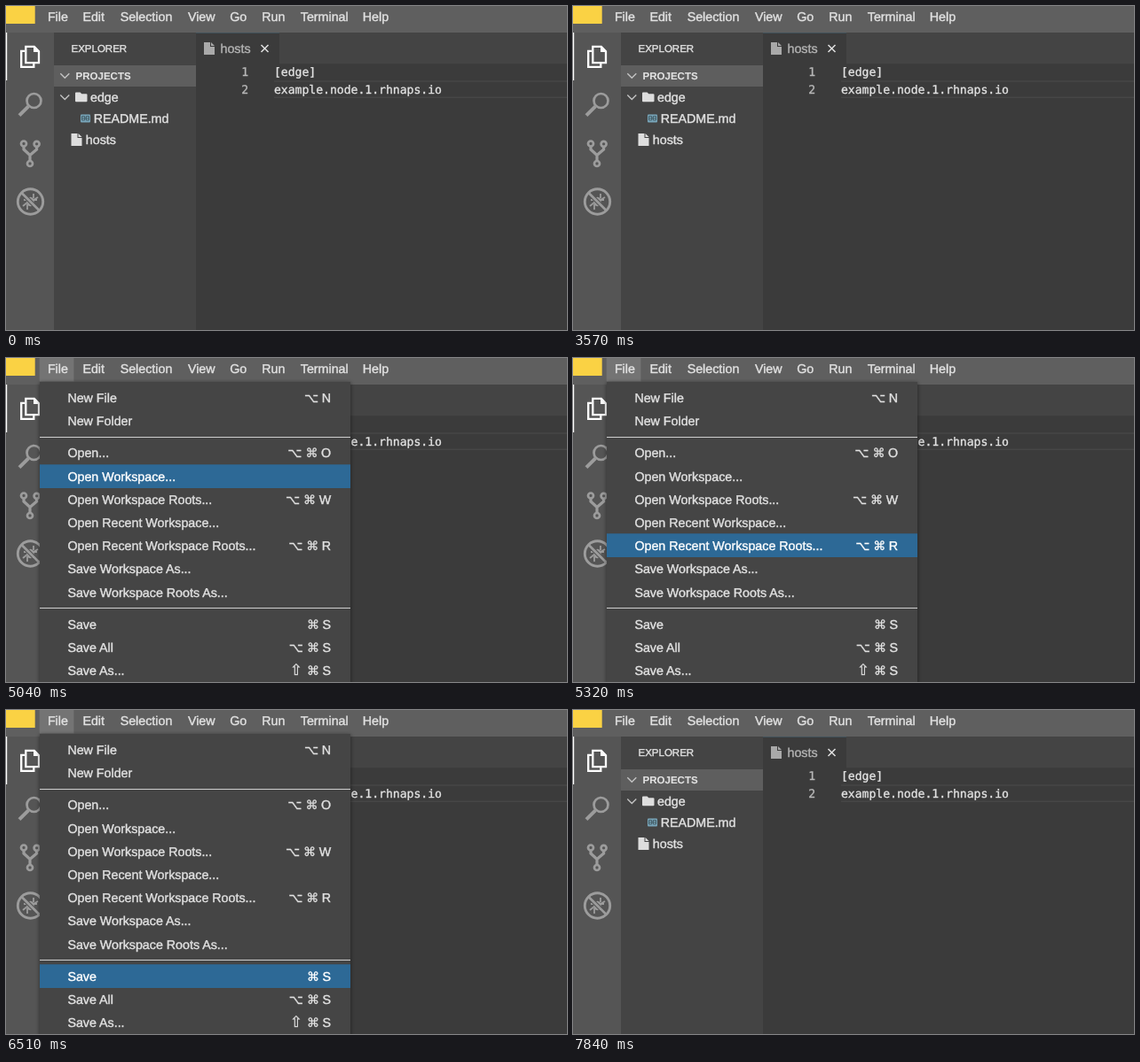
An HTML page that plays this animation: 632x366 px, repeating every 9.52 s.

```html
<!DOCTYPE html>
<html lang="en">
<head>
<meta charset="utf-8">
<title>Editor menu</title>
<style>
  html, body { margin: 0; width: 100%; height: 100%; overflow: hidden; background: #3b3b3b; }
  svg { display: block; width: 632px; height: 366px; }
  text {
    font: 14.25px "Liberation Sans", Arial, sans-serif;
    fill: currentColor; stroke: currentColor; stroke-width: .4px;
    color: #e2e2e2; text-rendering: geometricPrecision; white-space: pre;
  }
  .small { font-size: 11.5px; }
  .bold { font-weight: bold; stroke-width: .1px; }
  .code { font: 13.08px "DejaVu Sans Mono", monospace; stroke-width: .35px; }
  .key { font: 14px "DejaVu Sans", sans-serif; text-anchor: middle; stroke-width: .3px; }
  .shift { font-size: 17px; }
  .end { text-anchor: end; }
  .line { fill: none; stroke: #9c9c9c; stroke-width: 2.7; }
  #menu { visibility: hidden; }
  #menu.open { visibility: visible; }
  .row rect { fill: none; }
  .row.on rect { fill: #2d6996; }
  .row.on text { color: #fff; }
</style>
</head>
<body>
<svg viewBox="0 0 632 366">
  <defs>
    <path id="page" d="M0 0H7V5H12V14H0ZM8 0L12 4H8Z"/>
    <path id="chevron" d="M0 0L5 5L10 0" fill="none" stroke="#c4c4c4" stroke-width="1.3"/>
    <filter id="shadow" x="-5%" y="-5%" width="110%" height="110%">
      <feDropShadow dx="0" dy="1" stdDeviation="2.6" flood-color="#000" flood-opacity=".5"/>
    </filter>
  </defs>

  <!-- panels -->
  <rect width="632" height="366" fill="#3b3b3b"/>
  <rect width="632" height="30" fill="#5f5f5f"/>
  <rect y="30" width="54" height="336" fill="#555"/>
  <rect x="54" y="30" width="160" height="336" fill="#444"/>
  <rect x="54" y="67" width="160" height="24" fill="#5e5e5e"/>
  <rect x="308" y="30" width="324" height="35.3" fill="#444"/>
  <rect x="214" y="30" width="94" height="1" fill="#40505a"/>
  <rect width="32.7" height="20" fill="#fad244"/>

  <!-- activity bar -->
  <rect y="30" width="1.2" height="54" fill="#fff"/>
  <g class="line" style="stroke:#fff;stroke-width:2.3">
    <path d="M21 50.8H17.2V68.9H31.3V65"/>
    <path d="M22.3 45.8H31.8L37 51.3V64.2H22.3Z"/>
    <path d="M31 46V52H37Z" fill="#fff" stroke="none"/>
  </g>
  <g class="line">
    <circle cx="31.5" cy="107" r="8"/>
    <path d="M25.3 113.3L15 123.7" stroke-width="4"/>
    <circle cx="20" cy="155.5" r="3"/>
    <circle cx="34.6" cy="155.8" r="3"/>
    <circle cx="27" cy="178" r="3"/>
    <path d="M20 158.5V162L27 168.5V175M34.6 159V162L27 168.5" stroke-width="3.2"/>
    <circle cx="27.5" cy="221" r="14.2" stroke-width="2.9"/>
    <path d="M20 219H35M19 226L24 222M36 216L31 219M24 230V224M31 212V217M22 214L25 217M33 227L30 224" stroke-width="1.8"/>
    <ellipse cx="27.5" cy="221" rx="4.2" ry="5.2" fill="#9c9c9c" stroke="none"/>
    <path d="M19 212.5L36 229.5" stroke="#555" stroke-width="5"/>
    <path d="M17.5 211L37.5 231" stroke-width="2.6"/>
  </g>

  <!-- explorer -->
  <text class="small" x="73.5" y="52">EXPLORER</text>
  <use href="#chevron" x="61.3" y="76.3"/>
  <text class="small bold" x="78.6" y="83">PROJECTS</text>
  <use href="#chevron" x="61.3" y="100.5"/>
  <path d="M78 98.5Q78 97.5 79 97.5H83.5L85.3 99.3H90.5Q91.5 99.3 91.5 100.3V107.3Q91.5 108.3 90.5 108.3H79Q78 108.3 78 107.3Z" fill="#dedede"/>
  <text x="95" y="108">edge</text>
  <rect x="84" y="122.5" width="11" height="9" rx="1" fill="#78a6ba"/>
  <path d="M85.5 124.5H88.7V129H85.5ZM90.3 124.5H93.5V129H90.3ZM85.5 126.8H93.5" fill="none" stroke="#40565f" stroke-width=".9"/>
  <text x="98.7" y="132">README.md</text>
  <use href="#page" x="73.5" y="144" fill="#dedede"/>
  <text x="89.8" y="156">hosts</text>

  <!-- editor -->
  <use href="#page" x="223" y="41" fill="#a9a9a9"/>
  <text x="241.5" y="53" style="color:#b4b4b4">hosts</text>
  <path d="M287.5 44L295.5 52M295.5 44L287.5 52" class="line" style="stroke:#e2e2e2;stroke-width:1.5"/>
  <path d="M302 85H632M302 103.3H632" stroke="#464646" stroke-width="1.6"/>
  <text class="code end" x="273" y="79" style="color:#b8b8b8">1</text>
  <text class="code end" x="273" y="99" style="color:#b8b8b8">2</text>
  <text class="code" x="302" y="79">[edge]</text>
  <text class="code" x="302" y="99">example.node.1.rhnaps.io</text>

  <g id="menu">
    <rect x="37.7" width="38.7" height="26.5" fill="#747474"/>
    <rect x="38" y="27" width="350" height="350" fill="#444" filter="url(#shadow)"/>
    <path d="M38 89.5H388M38 282.5H388" stroke="#cfcfcf"/>
    <g id="rows"></g>
  </g>

  <g id="bar">
    <text x="46.9" y="16.7">File</text>
    <text x="86.4" y="16.7">Edit</text>
    <text x="128.7" y="16.7">Selection</text>
    <text x="204.9" y="16.7">View</text>
    <text x="252.2" y="16.7">Go</text>
    <text x="288.3" y="16.7">Run</text>
    <text x="331.8" y="16.7">Terminal</text>
    <text x="401.8" y="16.7">Help</text>
  </g>
</svg>
<script>
  const LOOP = 9520, OPEN = 3710, CLOSE = 6580;
  // top, label, shortcut
  const items = [
    [32, 'New File', '⌥N'],
    [58, 'New Folder', ''],
    [94, 'Open...', '⌥⌘O'],
    [121, 'Open Workspace...', ''],
    [147, 'Open Workspace Roots...', '⌥⌘W'],
    [173, 'Open Recent Workspace...', ''],
    [199, 'Open Recent Workspace Roots...', '⌥⌘R'],
    [225, 'Save Workspace As...', ''],
    [252, 'Save Workspace Roots As...', ''],
    [288, 'Save', '⌘S'],
    [314, 'Save All', '⌥⌘S'],
    [340, 'Save As...', '⇧⌘S']
  ];
  // time, hovered row
  const hover = [[0, -1], [4830, 0], [4900, 1], [4970, 2], [5040, 3], [5110, 4],
    [5250, 5], [5320, 6], [5460, 7], [5600, 8], [5740, 9]];
  const letterWidth = { N: 10.2, O: 11, W: 13.4, R: 10.2, S: 9.5 };

  function shortcut(keys, y) {
    if (!keys) return '';
    const letter = keys.at(-1);
    let x = 366 - letterWidth[letter] - 10.6;
    let out = `<text class="end" x="366.1" y="${y}">${letter}</text>`;
    for (const key of [...keys.slice(0, -1)].reverse()) {
      const size = key === '⇧' ? 'key shift' : 'key';
      out += `<text class="${size}" x="${x - (key === '⌘' ? 0 : 1.2)}" y="${y}">${key}</text>`;
      x -= 17.8;
    }
    return out;
  }

  const menu = document.getElementById('menu');
  const list = document.getElementById('rows');
  list.innerHTML = items.map(([top, label, keys]) =>
    `<g class="row"><rect x="38" y="${top - .7}" width="350" height="26.7"/>` +
    `<text x="69.4" y="${top + 18}">${label}</text>${shortcut(keys, top + 18)}</g>`).join('');
  const rows = [...list.children];

  function draw() {
    const t = performance.now() % LOOP;
    const active = hover.findLast(([start]) => start <= t)[1];
    menu.classList.toggle('open', t >= OPEN && t < CLOSE);
    rows.forEach((row, i) => row.classList.toggle('on', i === active));
    requestAnimationFrame(draw);
  }
  draw();
</script>
</body>
</html>
```
